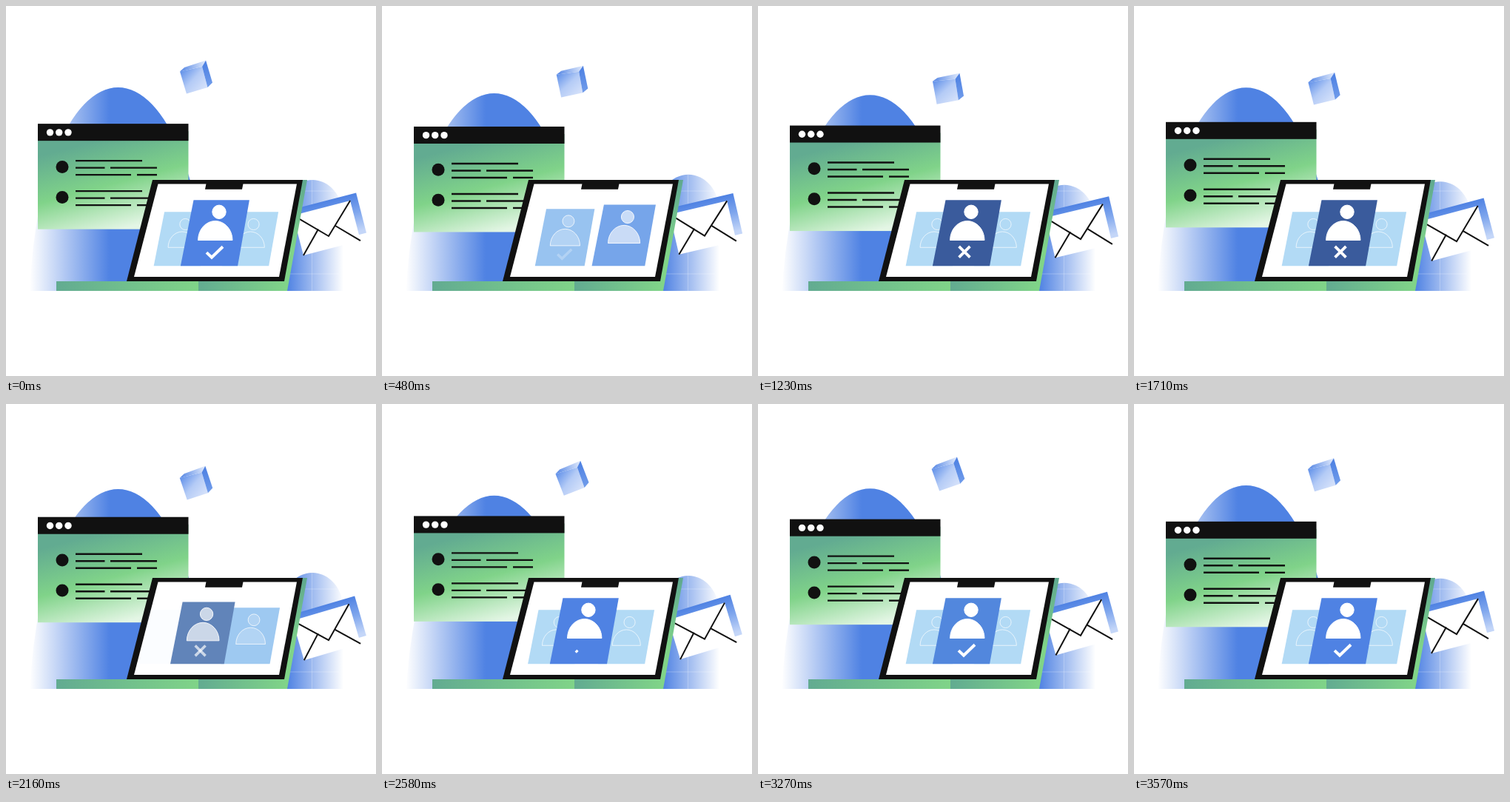
Animation, 500 px wide and 500 px high, one loop 3600 ms. Source, as an HTML page with a canvas:

```html
<!DOCTYPE html>
<html lang="en">
<head>
<meta charset="utf-8">
<title>Identity check</title>
<style>
html, body { margin: 0; width: 100%; height: 100%; overflow: hidden; background: #fff; }
canvas { display: block; width: 500px; height: 500px; }
</style>
</head>
<body>
<canvas id="stage"></canvas>
<script>
const LOOP = 3600, STEP = 30, HALF = LOOP / 2, FLOOR = 385;
const INK = '#111111';
const BLUE = [79, 130, 227], DARK = [58, 91, 156], PALE = [178, 218, 245], GREEN = [128, 212, 136];
const TEAL_HEX = '#62ab91', GREEN_HEX = '#80d488', BLUE_HEX = '#4f82e3';

const canvas = document.getElementById('stage');
const ctx = canvas.getContext('2d');
const density = window.devicePixelRatio || 1;
canvas.width = canvas.height = 500 * density;

const rgb = c => `rgb(${c.map(Math.round).join(',')})`;
const lerp = (a, b, k) => a + (b - a) * k;
const mix = (a, b, k) => a.map((v, i) => lerp(v, b[i], k));
const clamp = x => Math.min(1, Math.max(0, x));
const ramp = (t, from, to) => clamp((t - from) / (to - from));
const smooth = (t, from, to) => { const x = ramp(t, from, to); return x * x * (3 - 2 * x); };
const wave = (t, peak, period = LOOP) => Math.cos((t - peak) / period * Math.PI * 2);
// Ease from 0 past 1 to `over`, then settle on 1.
const overshoot = (t, from, top, end, over) =>
  over * smooth(t, from, top) + (1 - over) * smooth(t, top, end);

function gradient(x0, y0, x1, y1, ...colors) {
  const g = ctx.createLinearGradient(x0, y0, x1, y1);
  colors.forEach((c, i) => g.addColorStop(i / (colors.length - 1), c));
  return g;
}

function trace(points, closed) {
  ctx.beginPath();
  points.forEach(([x, y]) => ctx.lineTo(x, y));
  if (closed) ctx.closePath();
}

function fillPoly(points, style) {
  trace(points, true);
  ctx.fillStyle = style;
  ctx.fill();
}

function strokeLine(points, width, style) {
  trace(points, false);
  ctx.lineWidth = width;
  ctx.strokeStyle = style;
  ctx.stroke();
}

function disc(x, y, r, style) {
  ctx.beginPath();
  ctx.arc(x, y, r, 0, Math.PI * 2);
  ctx.fillStyle = style;
  ctx.fill();
}

function placed(x, y, draw, degrees = 0, scale = 1) {
  ctx.save();
  ctx.translate(x, y);
  ctx.rotate(degrees * Math.PI / 180);
  ctx.scale(scale, scale);
  draw();
  ctx.restore();
}

function hill(x, top, rx, ry, style) {
  ctx.beginPath();
  ctx.moveTo(x - rx, FLOOR);
  ctx.lineTo(x - rx, Math.min(top + ry, FLOOR + 60));
  ctx.ellipse(x, top + ry, rx, ry, 0, Math.PI, Math.PI * 2);
  ctx.lineTo(x + rx, FLOOR);
  ctx.fillStyle = style;
  ctx.fill();
}

function drawHills(t) {
  ctx.save();
  ctx.beginPath();
  ctx.rect(0, 0, 500, FLOOR);
  ctx.clip();
  hill(151.5, 117.25 - 7.25 * wave(t, 0, HALF), 119.5, 300,
    gradient(32, 0, 140, 0, '#ffffff', BLUE_HEX));
  const top = 235 - 7.4 * wave(t, HALF / 4, HALF);
  hill(414, top, 42, 50, gradient(380, 0, 456, 0, BLUE_HEX, '#ffffff'));
  const faint = 'rgba(255,255,255,.25)';
  strokeLine([[413.5, top], [413.5, FLOOR]], 1, faint);
  for (const y of [250, 306, 362]) strokeLine([[380, y], [450, y]], 1, faint);
  ctx.restore();
}

function drawCube(t) {
  const front = [[-22, -7.5], [8, -14], [15.5, 14], [-13, 22.5]];
  const lid = [[-22, -7.5], [-16, -13], [13, -22.5], [8, -14]];
  const side = [[8, -14], [13, -22.5], [22, 7.5], [15.5, 14]];
  placed(257, 103.5 + 9 * wave(t, 1470), () => {
    fillPoly(front, gradient(-18, -9, 10, 16, '#6795ea', '#b4cbf6', '#d3e0fa'));
    fillPoly(lid, gradient(-20, -8, 12, -18, '#5a8ae5', '#dbe6fb'));
    fillPoly(side, gradient(10, -18, 18, 12, BLUE_HEX, '#6f9bea'));
  }, 5.9 * (wave(t, 980) + 0.17));
}

function drawWindow(t) {
  placed(0, 157.5 + 6.1 * wave(t, 745), () => {
    ctx.fillStyle = gradient(122, 23, 154, 143, TEAL_HEX, '#80d389', '#e4f6e5');
    ctx.fillRect(43, 10, 203.5, 132.5);
    ctx.fillStyle = INK;
    ctx.fillRect(43, 0, 203.5, 23);
    for (const x of [59.5, 71.7, 84]) disc(x, 11.7, 4.7, '#ffffff');
    for (const y of [50, 91]) {
      disc(76, y + 8.3, 8.5, INK);
      const bars = [[94, 184, 0], [94, 133.5, 9.5], [141, 204, 9.5], [94, 169, 19], [177, 204, 19]];
      for (const [x0, x1, dy] of bars) strokeLine([[x0, y + dy], [x1, y + dy]], 2.4, INK);
    }
  });
}

function drawEnvelope(t) {
  const tl = [-48, -28], tr = [29, -48], br = [43, 6], bl = [-34, 26];
  const shift = ([x, y]) => [x + 8, y - 10.5];
  placed(436, 314.8 + 4.4 * wave(t, 2100), () => {
    fillPoly([tl, tr, br, bl].map(shift),
      gradient(0, -49, 13, 1, BLUE_HEX, '#7fa6ed', '#c4d6f8'));
    fillPoly([tl, tr, br, bl], '#ffffff');
    strokeLine([tl, [0, 0], tr], 2, INK);
    strokeLine([bl, [-14, -9.5]], 2, INK);
    strokeLine([br, [9, -14]], 2, INK);
  }, 2 * wave(t, 780) - 0.3);
}

function drawLaptop() {
  fillPoly([[400, 235], [407, 235], [380, FLOOR], [370, FLOOR]],
    gradient(0, 235, 0, 330, '#5fa890', GREEN_HEX));
  ctx.fillStyle = gradient(68, 0, 260, 0, TEAL_HEX, GREEN_HEX);
  ctx.fillRect(68, 372, 192, 13);
  fillPoly([[260, 372], [378, 372], [378, FLOOR], [260, FLOOR]],
    gradient(260, 0, 378, 0, TEAL_HEX, GREEN_HEX));
  fillPoly([[198, 235], [401, 235], [376, 372], [163, 372]], INK);
  fillPoly([[205.5, 240.5], [393, 240.5], [369, 366], [173, 366]], '#ffffff');
  fillPoly([[270.5, 240], [320.5, 240], [319, 247.7], [269, 247.7]], INK);
}

function drawMark(mark, progress, alpha) {
  if (progress <= 0) return;
  const style = `rgba(255,255,255,${alpha})`;
  if (mark === 'check') {
    const a = [-3.5, -18.2], b = [3.5, -11.5], c = [18.5, -26];
    const k1 = ramp(progress, 0, 0.32), k2 = ramp(progress, 0.32, 1);
    const points = [a, mix(a, b, k1)];
    if (k2 > 0) points.push(mix(b, c, k2));
    strokeLine(points, 4, style);
  } else {
    [-1, 1].forEach((side, i) => {
      const k = ramp(progress, i / 2, i / 2 + 0.5);
      const from = [4.5 + 7.4 * side, -26.4], to = [4.5 - 7.4 * side, -11.6];
      if (k > 0) strokeLine([from, mix(from, to, k)], 3.8, style);
    });
  }
}

// `calm` runs from 0 (active, centre) to 1 (small, outlined).
function drawCard({ x, calm, color, alpha = 1, mark, progress = 0 }) {
  if (alpha <= 0) return;
  ctx.save();
  ctx.globalAlpha = alpha;
  placed(x, 351.3, () => {
    fillPoly([[-21, -89], [54.4, -89], [38.6, 0], [-38.6, 0]], rgb(mix(color, PALE, calm)));
    ctx.save();
    ctx.translate(0, 4.3 * calm);
    ctx.fillStyle = `rgba(255,255,255,${1 - calm})`;
    ctx.strokeStyle = `rgba(255,255,255,${lerp(1, 0.85, calm)})`;
    ctx.lineWidth = 1;
    ctx.beginPath();
    ctx.arc(13.5, -73, 9.2, 0, Math.PI * 2);
    ctx.fill();
    ctx.stroke();
    ctx.beginPath();
    ctx.moveTo(-15, -34.8);
    ctx.ellipse(8.3, -34.8, 23.2, 26, 0, Math.PI, Math.PI * 2);
    ctx.closePath();
    ctx.fill();
    ctx.stroke();
    ctx.restore();
    drawMark(mark, progress, 1 - calm);
  }, 0, lerp(1, 0.82, calm));
  ctx.restore();
}

function drawCards(t) {
  const LEFT = 231.3, MID = 274.5, RIGHT = 323.5;
  const u = t % HALF, rejecting = t < HALF;
  const marked = ramp(u, 755, 990);
  const tint = rejecting
    ? mix(BLUE, DARK, smooth(u, 800, 1000))
    : mix(BLUE, GREEN, 0.9 * Math.sin(Math.PI * ramp(u, 840, 1530)) ** 2);

  const gone = smooth(u, 120, 400);
  drawCard({ x: LEFT - 22 * gone, calm: 1, color: PALE, alpha: 1 - gone });
  drawCard({ x: RIGHT, calm: 1, color: PALE, alpha: smooth(u, 560, 760) });

  const leaving = {
    x: lerp(MID, LEFT, overshoot(u, 180, 640, 960, 1.1)),
    calm: smooth(u, 200, 620),
    color: rejecting ? BLUE : DARK,
    mark: rejecting ? 'check' : 'cross',
    progress: 1
  };
  const arriving = {
    x: lerp(RIGHT, MID, overshoot(u, 430, 740, 980, 1.2)),
    calm: 1 - smooth(u, 240, 660),
    color: tint,
    mark: rejecting ? 'cross' : 'check',
    progress: marked
  };
  const order = u < 480 ? [arriving, leaving] : [leaving, arriving];
  order.forEach(drawCard);
}

function render(t) {
  ctx.setTransform(density, 0, 0, density, 0, 0);
  ctx.fillStyle = '#ffffff';
  ctx.fillRect(0, 0, 500, 500);
  drawHills(t);
  drawCube(t);
  drawWindow(t);
  drawEnvelope(t);
  drawLaptop();
  drawCards(t);
}

const start = performance.now();
function tick() {
  const elapsed = (performance.now() - start) % LOOP;
  render(Math.floor(elapsed / STEP) * STEP);
  requestAnimationFrame(tick);
}
tick();
</script>
</body>
</html>
```
